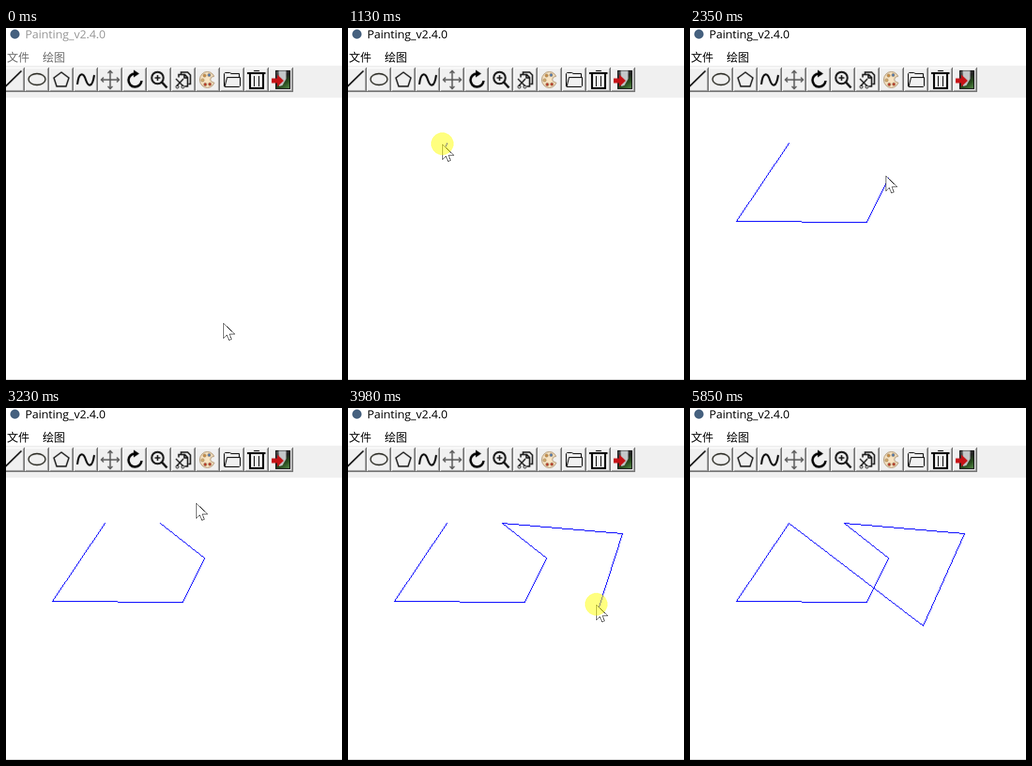
Recreate the animation shown at these times as an HTML page with a canvas. Size 716 by 748 pixels, loop 6120 ms.

```html
<!DOCTYPE html>
<html lang="zh-CN">
<head>
<meta charset="utf-8">
<title>Painting</title>
<style>
  html, body { margin: 0; width: 100%; height: 100%; overflow: hidden; background: #fff; }
  #stage { position: relative; width: 716px; height: 748px; overflow: hidden; }
  #stage > * { position: absolute; left: 0; }
  canvas { image-rendering: pixelated; width: 716px; }
  #tools { top: 80px; height: 68px; }
  #paper { top: 148px; height: 598px; }
  #edge { top: 747px; width: 716px; height: 1px; background: #b4b4b4; }
  svg { top: 0; }
  .title { font: 24.5px "Open Sans", "Noto Sans", sans-serif; }
  .menu { font: 24px "Noto Sans CJK SC", "Noto Sans CJK", sans-serif; font-weight: 300; }
</style>
</head>
<body>
<div id="stage">
  <canvas id="tools" width="358" height="34"></canvas>
  <canvas id="paper" width="358" height="299"></canvas>
  <div id="edge"></div>
  <svg width="716" height="748">
    <circle cx="19" cy="13" r="10" fill="#46617f"/>
    <text id="title" class="title" x="41" y="22">Painting_v2.4.0</text>
    <g id="menu" class="menu">
      <text x="2" y="71">文件</text>
      <text x="78" y="71">绘图</text>
    </g>
    <g id="pointer" shape-rendering="crispEdges">
      <path d="M.5 .5V32.5L7.5 25.5L12.5 36.5L17.5 34.5L13.5 23.5H24.5Z" fill="#fff" stroke="#000"/>
      <circle id="press" cy="-1" r="24" fill="#ff0" fill-opacity=".5"/>
    </g>
  </svg>
</div>
<script>
const LOOP = 6120;
const TICK = 124.2;
const FACE = '#f0f0f0';
const $ = id => document.getElementById(id);

// Toolbar: drawn in stage coordinates at half resolution
const g = $('tools').getContext('2d');
g.scale(.5, .5);
g.translate(0, -80);

function box(color, x, y, w, h) {
  g.fillStyle = color;
  g.fillRect(x, y, w, h);
}

function pen(width, color, d) {
  g.lineWidth = width;
  g.strokeStyle = color;
  g.stroke(new Path2D(d));
}

function fill(color, d) {
  g.fillStyle = color;
  g.fill(new Path2D(d));
}

function dot(x, y, rx, ry, color, line, width = 2) {
  g.beginPath();
  g.ellipse(x, y, rx, ry, 0, 0, 7);
  if (color) { g.fillStyle = color; g.fill(); }
  if (line) { g.lineWidth = width; g.strokeStyle = line; g.stroke(); }
}

function drawButtons() {
  box(FACE, 0, 80, 716, 68);
  for (let x = -12; x < 600; x += 52) {
    box('#696969', x, 84, 52, 52);
    box('#fff', x, 84, 50, 50);
    box('#a0a0a0', x + 2, 86, 48, 48);
    box(FACE, x + 2, 86, 46, 46);
  }
}

function drawShapeIcons() {
  pen(3.2, '#000', 'M-4 127L33 91');
  dot(66, 109, 18, 12, null, '#1c1c14', 2.6);
  pen(2.8, '#111', 'M118 94L134 106L128 124H108L102 106Z');
  pen(4, '#000', 'M152 120C155 92 165 95 170 110S184 128 188 100');
}

function drawEditIcons() {
  pen(3, '#555', 'M203 110H241M222 91V129');
  for (let i = 0; i < 4; i++) {
    g.save();
    g.translate(222, 110);
    g.rotate(i * Math.PI / 2);
    pen(2.6, '#555', 'M-5 -14L0 -19L5 -14');
    g.restore();
  }
  pen(5, '#000', 'M275 97A14 14 0 1 0 289 112');
  fill('#000', 'M272 89L284 97L272 105Z');

  dot(323, 106, 12.5, 12.5, null, '#111', 4);
  pen(3, '#111', 'M317 106H329M323 100V112');
  pen(5, '#111', 'M332 115L343 127');

  pen(3, '#111', 'M368 105V99H381L387 105V124H381M373 98V94H387L393 100V119H389M380 100V106H387');
  pen(2.6, '#111', 'M362 108L377 123M378 108L364 123');
  for (const x of [365, 377]) dot(x, 125, 3, 3, null, '#111');
}

function drawPalette() {
  dot(429, 110, 16, 17, '#f8e4c2', '#b39a78');
  fill(FACE, 'M448 101L437 105Q433 111 438 114L448 117Z');
  pen(2, '#b39a78', 'M444 102L437 105Q433 111 438 114L444 117');
  ['#c82818', '#c82818', '#e8b868', '#d89038', '#3a78c8'].forEach((color, i) => {
    const a = 1 + i * 1.03;
    dot(429 + 10 * Math.cos(a), 110 + 11 * Math.sin(a), 3, 3, color, '#8d7458', 1.5);
  });
}

function drawFileIcons() {
  pen(2, '#000', 'M465 124V97L467 95H477L480 97H497V104M466 125L471 105H499V123L497 125Z');

  pen(4, '#000', 'M514 96H553M520 98V128M548 98V128M518 128H550');
  pen(2, '#000', 'M528 91H540M529 102V124M539 102V124');

  const shade = g.createLinearGradient(578, 90, 606, 130);
  shade.addColorStop(0, '#555');
  shade.addColorStop(.4, '#222');
  shade.addColorStop(.65, '#284c1d');
  shade.addColorStop(1, '#5c9450');
  box('#111', 574, 90, 32, 40);
  g.fillStyle = shade;
  g.fillRect(576, 92, 28, 36);
  fill('#c4c8ca', 'M581 91H597V108L589 122L582 124Z');
  fill('#c51216', 'M566 107H578V99L592 112L578 125V117H566Z');
}

// The pointer eases from one key point to the next, one position per tick
const frames = [];
const corners = [];
let pointer = [463, 627];
let active = false;
const hot = ([x, y]) => [x + 6, y + 5];

function record(held, points) {
  frames.push({ pointer, held, active, points });
}

function go(x, y, ticks = 1, mode = '') {
  const from = pointer;
  const dragging = mode === 'drag' || mode === 'drop';
  if (dragging && !corners.length) corners.push(hot(from));
  for (let i = 1; i <= ticks; i++) {
    const p = Math.sin(i / ticks * Math.PI / 2);
    const last = i === ticks;
    pointer = [from[0] + (x - from[0]) * p, from[1] + (y - from[1]) * p].map(Math.round);
    if (last && mode === 'tap') active = true;
    if (last && (mode === 'drop' || mode === 'click')) corners.push(hot(pointer));
    const loose = dragging ? [hot(pointer)] : mode === 'close' ? [corners[0]] : [];
    record(dragging || last && (mode === 'tap' || mode === 'click'), [...corners, ...loose]);
  }
}

function wait() {
  frames.push(frames.at(-1));
}

record(false, []);
go(37, 114, 5);
go(108, 110, 1, 'tap');
go(205, 239, 2);
go(201, 247, 1, 'drag');
go(93, 405, 2, 'drop');
go(370, 408, 4, 'click');
go(417, 314, 2, 'click');
go(417, 314, 2);
go(323, 240, 3, 'click');
wait();
go(405, 202, 3);
go(541, 281, 2, 'drag');
go(579, 262, 2, 'drop');
go(529, 418, 2, 'drag');
go(491, 458, 1, 'drop');
go(111, 128, 5);
go(115, 108);
corners.push(corners[0]);
go(115, 108);
wait();
go(645, 720, 5);
go(800, 800);

const paper = $('paper').getContext('2d');
paper.fillStyle = '#00f';

function pixelLine([x0, y0], [x1, y1]) {
  const ax = x0 >> 1, ay = (y0 >> 1) - 74;
  const dx = (x1 >> 1) - ax, dy = (y1 >> 1) - 74 - ay;
  const n = Math.max(Math.abs(dx), Math.abs(dy), 1);
  for (let i = 0; i <= n; i++) {
    paper.fillRect(Math.round(ax + dx * i / n), Math.round(ay + dy * i / n), 1, 1);
  }
}

let shown;
function render(t) {
  const frame = frames[Math.min(Math.floor(t / TICK), frames.length - 1)];
  if (frame === shown) return;
  shown = frame;
  $('title').setAttribute('fill', frame.active ? '#000' : '#999');
  $('menu').setAttribute('fill', frame.active ? '#000' : '#6d6d6d');
  $('pointer').setAttribute('transform', `translate(${frame.pointer})`);
  $('press').setAttribute('visibility', frame.held ? 'visible' : 'hidden');
  paper.clearRect(0, 0, 358, 299);
  frame.points.forEach((point, i, all) => i && pixelLine(all[i - 1], point));
}

drawButtons();
drawShapeIcons();
drawEditIcons();
drawPalette();
drawFileIcons();

const begin = performance.now();
function loop() {
  render((performance.now() - begin) % LOOP);
  requestAnimationFrame(loop);
}
loop();
</script>
</body>
</html>
```
